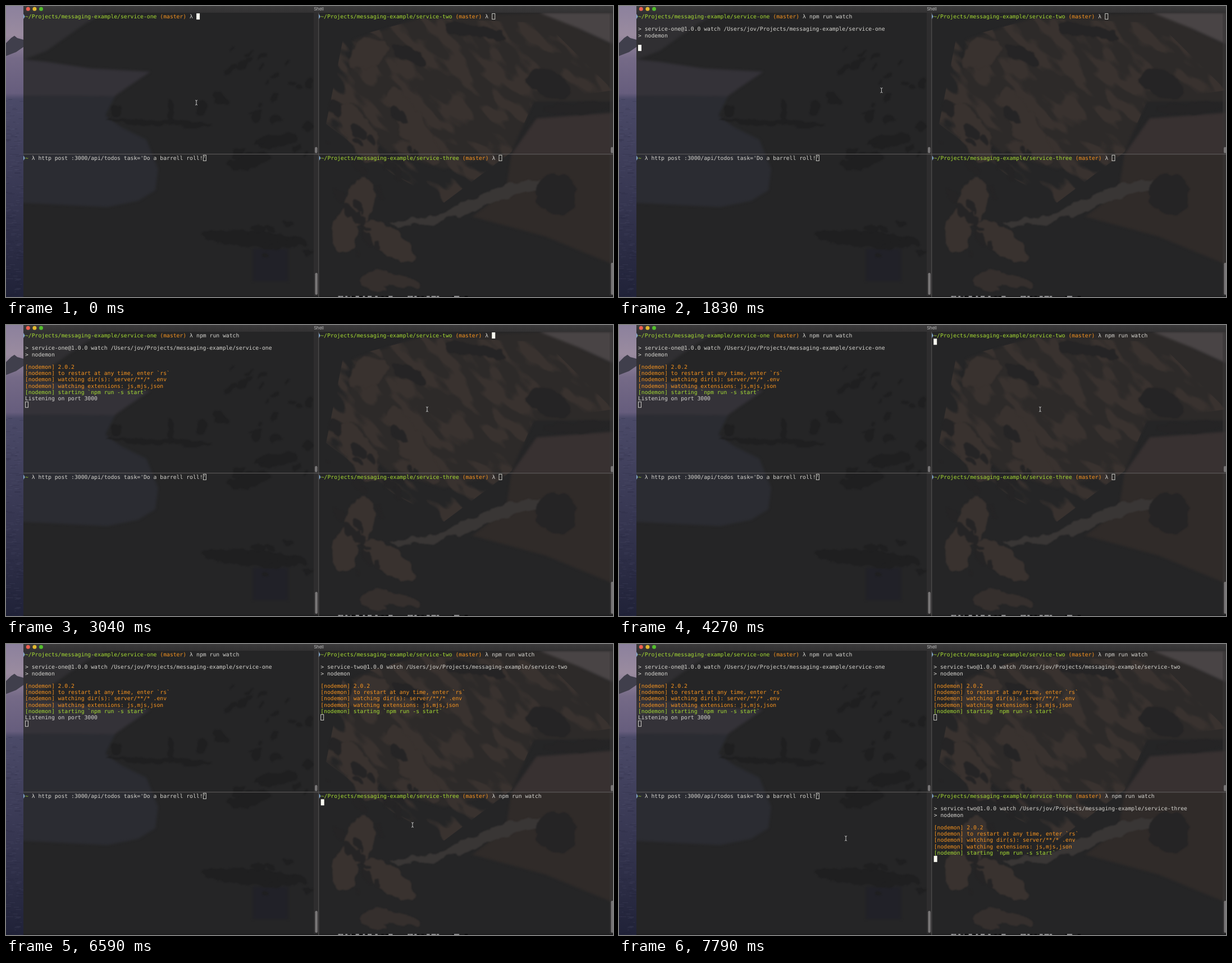
These frames come from a looping animation (1081 by 518 pixels, 8000 ms). An HTML page:

```html
<!DOCTYPE html>
<html lang="en">
<head>
<meta charset="utf-8">
<title>Shell</title>
<style>
html, body { margin: 0; width: 100%; height: 100%; overflow: hidden; background: #252526; }
svg { position: absolute; left: 0; top: 0; display: block; }
.mono { font: 9.745px "DejaVu Sans Mono", monospace; white-space: pre; text-rendering: geometricPrecision; }
.title { font: 7.7px Inter, sans-serif; fill: #c0c0c0; text-anchor: middle; }
</style>
</head>
<body>
<svg width="1081" height="518" viewBox="0 0 1081 518">
  <defs>
    <linearGradient id="sky" x2="0" y2="1">
      <stop offset="0" stop-color="#8c819d"/><stop offset=".1" stop-color="#9a8b9f"/>
      <stop offset=".18" stop-color="#756a87"/><stop offset=".3" stop-color="#665d7d"/>
      <stop offset=".32" stop-color="#4b4a68"/><stop offset=".65" stop-color="#373752"/>
      <stop offset="1" stop-color="#202238"/>
    </linearGradient>
    <linearGradient id="bar" x2="0" y2="1">
      <stop offset="0" stop-color="#3b3a3b"/><stop offset="1" stop-color="#323132"/>
    </linearGradient>
    <filter id="rough" filterUnits="userSpaceOnUse" x="0" y="0" width="1081" height="518" color-interpolation-filters="sRGB">
      <feTurbulence type="fractalNoise" baseFrequency=".045" numOctaves="2" seed="4" result="n"/>
      <feDisplacementMap in="SourceGraphic" in2="n" scale="18" xChannelSelector="R" yChannelSelector="G"/>
      <feGaussianBlur stdDeviation=".8"/>
    </filter>
    <filter id="soft" filterUnits="userSpaceOnUse" x="0" y="0" width="1081" height="518" color-interpolation-filters="sRGB">
      <feGaussianBlur stdDeviation="2"/>
    </filter>
    <filter id="mottle" color-interpolation-filters="sRGB">
      <feTurbulence type="fractalNoise" baseFrequency=".018 .042" numOctaves="2" seed="9"/>
      <feColorMatrix values="0 0 0 0 0  0 0 0 0 0  0 0 0 0 0  8 0 0 0 -3.8" result="m"/>
      <feComposite in="SourceGraphic" in2="m" operator="in"/>
    </filter>
    <clipPath id="win"><rect x="31" y="12" width="1050" height="504"/></clipPath>
    <clipPath id="hill"><path d="M600 60 L740 22 L960 30 L1081 150 L940 170 L900 260 L780 350 L690 300 L570 210Z"/></clipPath>
  </defs>
  <rect width="31" height="518" fill="url(#sky)"/>
  <path d="M0 66 L9 57 L15 53 L20 57 L31 60 V73 L18 82 L0 89Z" fill="#403f4c"/>
  <g id="waves"/>
  <rect x="31" width="1050" height="518" fill="#252526"/>
  <g clip-path="url(#win)">
    <g id="haze" filter="url(#soft)"/>
    <g clip-path="url(#hill)">
      <g transform="rotate(45 800 180)"><rect x="550" y="-70" width="500" height="500" fill="#39322f" filter="url(#mottle)"/></g>
    </g>
    <g id="land" filter="url(#rough)"/>
  </g>
  <g id="chrome"/>
  <g id="front"/>
</svg>
<script>
const NS = 'http://www.w3.org/2000/svg';
const $ = id => document.getElementById(id);
const CELL = 5.867, ROW = 11.2, TOP = 13.1, BOTTOM = 265.1;
const GREEN = '#a6dc33', ORANGE = '#f7941f', WHITE = '#d5d4cf', CURSOR = '#f8f8f0';

function add(parent, tag, attrs, text) {
  const el = document.createElementNS(NS, tag);
  for (const k in attrs) el.setAttribute(k, attrs[k]);
  if (text !== undefined) el.textContent = text;
  parent.appendChild(el);
  return el;
}
const rect = (p, x, y, width, height, fill, rx = 0) => add(p, 'rect', { x, y, width, height, fill, rx });
const poly = (p, fill, points) => add(p, 'polygon', { fill, points });
const blob = (fill, cx, cy, rx, ry, angle = 0) =>
  add($('land'), 'ellipse', { fill, cx, cy, rx, ry, transform: `rotate(${angle} ${cx} ${cy})` });

let seed = 11;
const rnd = () => (seed = seed * 16807 % 2147483647) / 2147483647;
const between = (a, b) => a + (b - a) * rnd();

function specks(n, x, y, w, h, size, angle, fill) {
  for (let i = 0; i < n; i++) {
    const r = size * between(.5, 1.5);
    blob(fill, x + rnd() * w, y + rnd() * h, r, r * between(.35, .65), angle + between(-15, 15));
  }
}

function scenery() {
  const haze = $('haze'), land = $('land');
  const dark = '#1f1f20', brown = '#39322f', coal = '#252425';

  // Bay on the left: sky, far water, near water
  poly(haze, '#302f32', '20,0 200,0 140,32 72,80 20,100');
  poly(haze, '#343238', '20,94 70,99 150,111 257,117 214,146 193,161 20,160');
  poly(haze, '#2b2c32', '20,160 194,161 177,195 204,215 250,238 271,290 266,328 235,347 180,358 20,350');
  rect(haze, 440, 432, 62, 58, '#212128');

  // Slope, water and far shore on the right
  poly(haze, '#2d2a29', '620,60 740,20 960,12 1081,70 1081,170 940,170 900,260 780,290 680,260 600,190');
  poly(haze, '#383131', '945,200 1081,190 1081,264 900,264');
  poly(haze, '#302b29', '900,264 1081,264 1081,460 960,410 830,375 890,330');
  poly(haze, '#494445', '950,12 1081,12 1081,68 1020,40');

  // Rocks along the headland
  blob(dark, 198, 188, 9, 10);
  blob(dark, 275, 209, 95, 5, 3);
  blob(dark, 293, 188, 5, 24);
  blob(dark, 350, 183, 9, 14);
  blob(dark, 383, 165, 16, 11, 30);
  blob(dark, 482, 240, 36, 13, -10);
  blob(dark, 435, 276, 38, 13, -10);
  blob(dark, 440, 415, 95, 14, 4);
  specks(26, 400, 75, 145, 190, 8, -35, dark);
  specks(14, 390, 385, 150, 60, 9, 10, dark);

  blob(brown, 645, 85, 36, 24, -30);
  blob(brown, 630, 225, 60, 24, 60);
  blob(brown, 725, 215, 80, 22, 58);
  specks(14, 570, 180, 160, 120, 12, 50, coal);
  blob(coal, 965, 138, 42, 22, 25);
  blob(coal, 1020, 181, 62, 9, -3);
  blob(coal, 835, 45, 55, 12, 10);
  blob(coal, 715, 85, 34, 12, 25);

  // Lower cliff, its path and the cove
  blob(brown, 630, 350, 24, 45, 10);
  blob(brown, 605, 400, 22, 40, 10);
  blob(brown, 685, 420, 58, 22, 38);
  specks(12, 580, 320, 110, 120, 11, 60, coal);
  specks(5, 650, 475, 160, 30, 20, 0, '#352f2d');
  poly(land, '#393635', '685,386 760,374 840,338 900,316 952,306 948,326 880,343 830,368 760,386 700,396');
  blob(coal, 980, 335, 38, 36, 20);
}

function seaAndShore() {
  for (let i = 0; i < 170; i++)
    rect($('waves'), between(-4, 26), between(166, 518), between(3, 12), .7, rnd() < .5 ? '#6f6e8c38' : '#14162840');
  rect($('chrome'), 31, 516, 1050, 2, '#1d1d1e');
  for (let i = 0; i < 34; i++)
    rect($('chrome'), 588 + 240 * rnd() ** 1.6, 516, between(2, 8), 2, rnd() < .6 ? '#8b8b8d' : '#0b0b0c');
}

function windowFrame() {
  const g = $('chrome');
  rect(g, 31, 0, 1050, 12, 'url(#bar)');
  ['#ed5f50', '#e3b92d', '#53bf2c'].forEach((fill, i) =>
    add(g, 'circle', { cx: 39.3 + i * 11.6, cy: 5.3, r: 3.5, fill }));
  add(g, 'text', { x: 557, y: 8.3, class: 'title' }, 'Shell');
  for (const [x, w, y] of [[548, 8.5, 475], [1075, 6, 457]]) {
    rect(g, x, 12, w, 504, '#39363680');
    rect(g, x + 2, 251, 4.5, 11, '#777576', 2.2);
    rect(g, x + 2.4, y, 4.5, 514 - y, '#777576', 2.2);
  }
  rect(g, 556.3, 12, 1, 506, '#5b5959');
  rect(g, 31, 263.2, 1050, 1, '#646262');
}

// Each row: [number, text, colour, text, colour, ...]
function block(x, top, rows) {
  const g = add($('front'), 'g', {});
  for (const [row, ...parts] of rows) {
    const t = add(g, 'text', { x, y: top + row * ROW + 8.9, class: 'mono' });
    for (let i = 0; i < parts.length; i += 2) add(t, 'tspan', { fill: parts[i + 1] }, parts[i]);
  }
  return g;
}

function prompt(x, top, ...parts) {
  add($('front'), 'path', { d: `M${x - 2.8} ${top + 1} l2.3 4.6 -2.3 4.6Z`, fill: '#8fb9e0' });
  block(x, top, [[0, ...parts]]);
  return { x, top, cursor: rect($('front'), 0, 0, 0, 0, 'none') };
}

// start: times of command, enter, header, nodemon lines, listening; focus: from, to
function servicePane(x, top, dir, pkg, start, focus) {
  const path = '~/Projects/messaging-example/' + dir;
  const col = path.length + 12;
  const notes = ['2.0.2', 'to restart at any time, enter `rs`',
    'watching dir(s): server/**/* .env', 'watching extensions: js,mjs,json', 'starting `npm run -s start`'];
  const parts = [
    block(x + col * CELL, top, [[0, 'npm run watch', WHITE]]),
    null,
    block(x, top, [
      [2, `> ${pkg}@1.0.0 watch /Users/jov/Projects/messaging-example/${dir}`, WHITE],
      [3, '> nodemon', WHITE]]),
    block(x, top, notes.map((s, i) => [5 + i, '[nodemon] ' + s, i < 4 ? ORANGE : GREEN])),
    block(x, top, [[10, 'Listening on port 3000', WHITE]])
  ];
  return { ...prompt(x, top, path, GREEN, ' (master)', ORANGE, ' λ', WHITE), col, parts, start, focus };
}

function setCursor(o, col, row, solid) {
  const inset = solid ? 0 : .5;
  const a = { x: o.x + col * CELL + inset, y: o.top + row * ROW + inset, width: 6 - 2 * inset, height: 11 - 2 * inset,
    fill: solid ? CURSOR : 'none', stroke: solid ? 'none' : '#dcdcd6', 'stroke-width': .9 };
  for (const k in a) o.cursor.setAttribute(k, a[k]);
}

function drawPane(o, t) {
  const on = o.start.map(s => t >= s);
  o.parts.forEach((g, i) => g && g.setAttribute('visibility', on[i] ? 'visible' : 'hidden'));
  const row = [0, 0, 1, 5, 10, 11][on.filter(Boolean).length];
  const col = row ? 0 : o.col + (on[0] ? 13 : 0);
  setCursor(o, col, row, t >= o.focus[0] && t < o.focus[1]);
}

scenery();
seaAndShore();
windowFrame();

const panes = [
  servicePane(34, TOP, 'service-one', 'service-one', [870, 1470, 1830, 1940, 2650], [0, 2890]),
  servicePane(560.2, TOP, 'service-two', 'service-two', [3790, 4270, 4510, 4630, Infinity], [2890, 5730]),
  servicePane(560.7, BOTTOM, 'service-three', 'service-two', [6230, 6590, 6830, 6950, Infinity], [5730, Infinity])
];
const client = prompt(34, BOTTOM, '~', GREEN, " λ http post :3000/api/todos task='Do a barrell roll!'", WHITE);
setCursor(client, 54, 0, false);

const pointer = add($('front'), 'g', {});
const beam = 'M-2 -4.3 Q0 -4.3 0 -2.8 Q0 -4.3 2 -4.3 M0 -3 V3 M-2 4.3 Q0 4.3 0 2.8 Q0 4.3 2 4.3';
add(pointer, 'path', { d: beam, fill: 'none', stroke: '#151515', 'stroke-width': 2, opacity: .4 });
add(pointer, 'path', { d: beam, fill: 'none', stroke: '#d8d8d8', 'stroke-width': .9 });

// Each glide moves the pointer in even time steps, easing out by one power per axis
const home = [339, 172];
const glides = [
  { from: 1830, to: 2530, steps: 7, end: [669, 148], power: [3.2, 16] },
  { from: 2890, to: 3040, steps: 2, end: [750, 150], power: [.23, .23] },
  { from: 4740, to: 5100, steps: 4, end: [739, 287], power: [1, 1.5] },
  { from: 5340, to: 5460, steps: 2, end: [724, 322], power: [1, 1] },
  { from: 7430, to: 7790, steps: 4, end: [404, 346], power: [1.2, 1.2] }
];

function pointerAt(t) {
  let pos = home;
  for (const { from, to, steps, end, power } of glides) {
    if (t < from) break;
    const k = Math.floor((t - from) / (to - from) * (steps - 1) + .04);
    const s = Math.min(1, (k + 1) / steps);
    pos = pos.map((p, i) => p + (end[i] - p) * (1 - (1 - s) ** power[i]));
  }
  return pos;
}

function draw(t) {
  panes.forEach(o => drawPane(o, t));
  pointer.setAttribute('transform', `translate(${pointerAt(t)})`);
}

const begin = performance.now();
function tick() {
  draw((performance.now() - begin) % 8000);
  requestAnimationFrame(tick);
}
draw(0);
requestAnimationFrame(tick);
</script>
</body>
</html>
```
